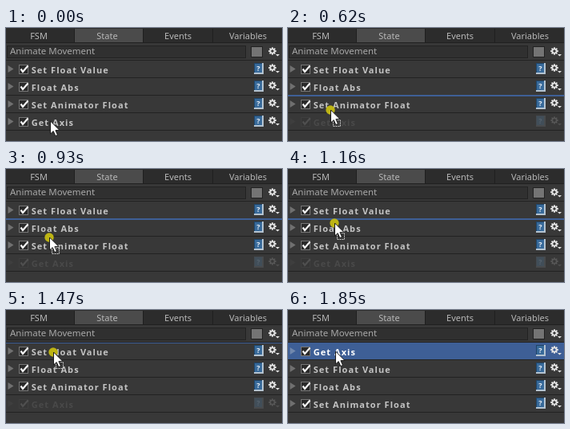
An HTML page with a canvas for the animation above (3.85 s loop, 345 px wide and 142 px high).

```html
<!DOCTYPE html>
<html lang="en">
<head>
<meta charset="utf-8">
<title>Reordering actions</title>
<style>
html, body { margin: 0; width: 100%; height: 100%; overflow: hidden; background: #383838; }
canvas { display: block; }
</style>
</head>
<body>
<canvas id="stage" width="345" height="142"></canvas>
<script>
const ctx = document.getElementById('stage').getContext('2d');
const W = 345, H = 142, LOOP = 3850;
const ROW_TOP = 41, ROW_H = 22;
const FONT = '"Noto Sans", "Open Sans", sans-serif';
const ACTIONS = ['Set Float Value', 'Float Abs', 'Set Animator Float', 'Get Axis'];
const REORDERED = [ACTIONS[3], ...ACTIONS.slice(0, 3)];

// Moments of the pointer: time, x, y
const POINTER = [
  [0, 55, 117], [230, 55, 118], [460, 55, 118], [540, 54, 112], [620, 53, 103],
  [690, 53, 99], [770, 53, 95], [850, 53, 91], [930, 54, 86], [1010, 55, 80],
  [1090, 57, 74], [1160, 58, 68], [1240, 58, 64], [1320, 59, 60], [1400, 59, 57],
  [1470, 59, 53], [1800, 59, 52], [1850, 59, 52]
];
const PRESS = 230, DRAG = 540, DROP = 1800, SELECT = 1850;

function rect(x, y, w, h, color) {
  ctx.fillStyle = color;
  ctx.fillRect(x, y, w, h);
}

function frame(x, y, w, h, color) {
  ctx.strokeStyle = color;
  ctx.lineWidth = 1;
  ctx.strokeRect(x + 0.5, y + 0.5, w - 1, h - 1);
}

function path(points, close = true) {
  ctx.beginPath();
  points.forEach(([x, y]) => ctx.lineTo(x, y));
  if (close) ctx.closePath();
}

function disc(x, y, r, color) {
  ctx.fillStyle = color;
  ctx.beginPath();
  ctx.arc(x, y, r, 0, Math.PI * 2);
  ctx.fill();
}

function text(str, x, y, color, { bold = false, align = 'left', size = 11 } = {}) {
  ctx.font = `${bold ? 'bold ' : ''}${size}px ${FONT}`;
  ctx.letterSpacing = bold ? '1.05px' : '0px';
  ctx.textAlign = align;
  ctx.fillStyle = color;
  ctx.fillText(str, x, y);
}

function gear(x, y) {
  ctx.strokeStyle = '#e4e4e4';
  ctx.lineWidth = 1.8;
  ctx.beginPath();
  for (let i = 0; i < 8; i++) {
    const a = i * Math.PI / 4, c = Math.cos(a), s = Math.sin(a);
    ctx.moveTo(x + 2.6 * c, y + 2.6 * s);
    ctx.lineTo(x + 4.8 * c, y + 4.8 * s);
  }
  ctx.stroke();
  ctx.beginPath();
  ctx.arc(x, y, 2.6, 0, Math.PI * 2);
  ctx.stroke();
  path([[x + 4, y + 4], [x + 9, y + 4], [x + 6.5, y + 6.5]]);
  ctx.fillStyle = '#e4e4e4';
  ctx.fill();
}

function helpBook(x, y) {
  rect(x, y, 12, 14, '#b4c3d0');
  rect(x, y, 10, 12, '#1f4468');
  rect(x + 1, y + 1, 9, 11, '#386a9a');
  ctx.font = `bold 9px ${FONT}`;
  ctx.letterSpacing = '0px';
  ctx.textAlign = 'center';
  ctx.fillStyle = '#e8eef4';
  ctx.fillText('?', x + 5.5, y + 10);
}

function checkbox(x, y) {
  rect(x, y, 12, 12, '#292929');
  frame(x, y, 12, 12, '#777');
  path([[x + 2.5, y + 5.5], [x + 5, y + 9], [x + 11.5, y + 1.5]], false);
  ctx.strokeStyle = '#f4f4f4';
  ctx.lineWidth = 2.2;
  ctx.stroke();
}

function row(label, index, ghost, selected) {
  const y = ROW_TOP + index * ROW_H;
  if (selected) rect(0, y, W, ROW_H - 1, '#3e5f96');
  ctx.save();
  if (ghost) ctx.globalAlpha = 0.13;
  path([[2.5, y + 6], [9.5, y + 10.5], [2.5, y + 15]]);
  ctx.fillStyle = selected ? '#7188ad' : '#707070';
  ctx.fill();
  checkbox(16, y + 5);
  text(label, 31.7, y + 16, selected ? '#fff' : '#c4c4c4', { bold: true });
  helpBook(310, y + 3);
  gear(333, y + 9);
  ctx.restore();
}

function header() {
  rect(0, 0, W, 19, '#2c2c2c');
  rect(85, 1, 86, 17, '#4b4b4b');
  [85, 171, 258].forEach(x => rect(x, 1, 1, 17, '#1f1f1f'));
  rect(0, 18, W, 1, '#202020');
  [['FSM', 41], ['State', 126.5], ['Events', 215], ['Variables', 302.5]].forEach(
    ([name, x]) => text(name, x, 14, '#b8b8b8', { align: 'center' }));
  rect(1, 22, 299, 16, '#303030');
  frame(1, 22, 299, 16, '#222');
  text('Animate Movement', 5, 33, '#a8a8a8', { size: 11.5 });
  rect(306, 23, 15, 14, '#747474');
  frame(306, 23, 15, 14, '#222');
  gear(333, 29);
}

function pointer(x, y, pressed, dragging) {
  if (pressed) disc(x, y, 5.7, '#bdb414');
  if (dragging) {
    ctx.setLineDash([2, 1]);
    frame(x + 3, y + 12, 10, 9, '#c8c8c8');
    ctx.setLineDash([]);
  }
  path([[0, 0], [0, 16], [3.7, 12.6], [6.3, 18.6], [9, 17.4], [6.4, 11.6], [11.4, 11.4]]
    .map(([dx, dy]) => [x + 0.5 + dx, y + dy]));
  ctx.fillStyle = '#fff';
  ctx.fill();
  ctx.strokeStyle = '#1c1c1c';
  ctx.lineWidth = 1;
  ctx.stroke();
}

function draw(time) {
  const [, x, y] = POINTER.filter(p => p[0] <= time).pop();
  const dragging = time >= DRAG && time < DROP;
  const dropped = time >= DROP;

  rect(0, 0, W, H, '#383838');
  header();
  for (let i = 0; i <= ACTIONS.length; i++) {
    rect(0, ROW_TOP + i * ROW_H - 1, W, 1, '#222');
  }
  (dropped ? REORDERED : ACTIONS).forEach((label, i) =>
    row(label, i, dragging && i === 3, time >= SELECT && i === 0));

  if (dragging) {
    // The row changes a little below its top edge; the list clips the line
    const target = Math.floor((y - ROW_TOP - 4) / ROW_H);
    const top = Math.max(ROW_TOP, ROW_TOP + target * ROW_H - 1);
    rect(0, top, W, ROW_TOP + target * ROW_H + 1 - top, '#3e5f96');
  }
  pointer(x, y, time >= PRESS && !dropped, dragging);
}

const start = performance.now();
function tick() {
  draw((performance.now() - start) % LOOP);
  requestAnimationFrame(tick);
}
tick();
</script>
</body>
</html>
```
